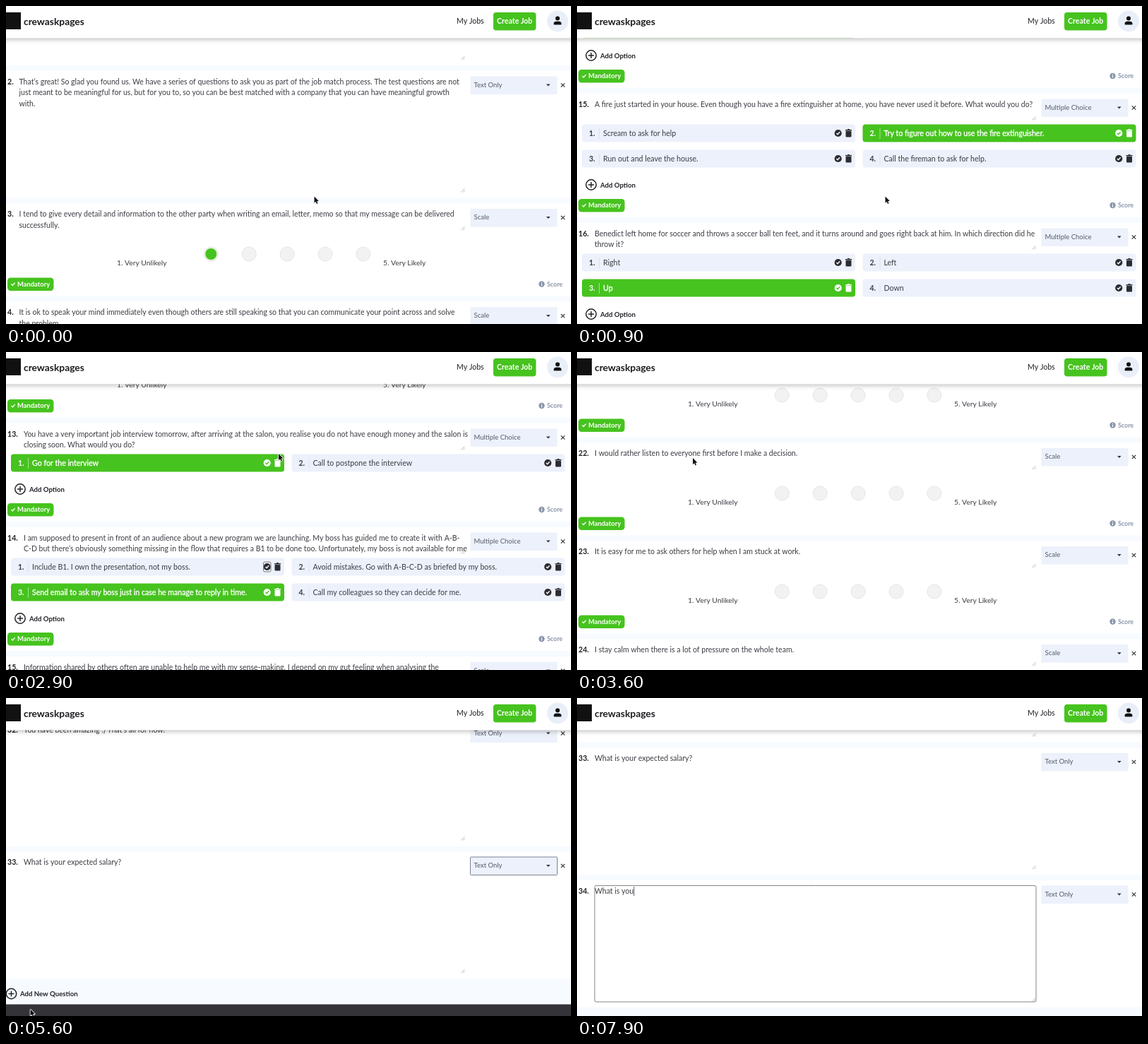
Recreate the animation shown at these times as an HTML page with a canvas. Size 800 by 450 pixels, loop 8 s.

```html
<!DOCTYPE html>
<html lang="en">
<head>
<meta charset="utf-8">
<title>Question editor</title>
<style>
html, body { margin: 0; width: 100%; height: 100%; overflow: hidden; background: #fff; }
canvas { display: block; }
</style>
</head>
<body>
<canvas id="stage" width="800" height="450"></canvas>
<script>
const c = document.getElementById('stage').getContext('2d');
const GREEN = '#46c31e', PALE = '#ecf1fb', INK = '#3c3c44', DARK = '#222228', SLATE = '#8a96ab';
const LOOP = 8000, STEP = 100;

// Drawing helpers
function text(s, x, y, size = 10.52, color = INK, weight = 400) {
  c.font = `${weight} ${size}px Lato, sans-serif`;
  c.fillStyle = color;
  c.fillText(s, x, y + size * 0.35);
}
function box(x, y, w, h, r, fill, stroke, line = 1) {
  c.beginPath();
  c.roundRect(x, y, w, h, r);
  if (fill) { c.fillStyle = fill; c.fill(); }
  if (stroke) { c.strokeStyle = stroke; c.lineWidth = line; c.stroke(); }
}
function disc(x, y, r, fill, stroke, line = 1) {
  c.beginPath();
  c.arc(x, y, r, 0, 7);
  if (fill) { c.fillStyle = fill; c.fill(); }
  if (stroke) { c.strokeStyle = stroke; c.lineWidth = line; c.stroke(); }
}
function path(points, color, line) {
  c.beginPath();
  points.forEach(([x, y]) => c.lineTo(x, y));
  if (line) { c.strokeStyle = color; c.lineWidth = line; c.stroke(); }
  else { c.fillStyle = color; c.fill(); }
}
function tick(x, y, color, s = 1) {
  path([[x - 2.5 * s, y], [x - 0.7 * s, y + 1.9 * s], [x + 2.7 * s, y - 1.9 * s]], color, 1.4);
}
function plus(x, y, label, labelX) {
  disc(x, y, 7.2, null, DARK, 1.5);
  path([[x - 4, y], [x + 4, y]], DARK, 1.5);
  path([[x, y - 4], [x, y + 4]], DARK, 1.5);
  text(label, labelX, y + 0.5, 9.6, DARK, 700);
}
function grip(x, y) {
  path([[x - 2.5, y + 2.5], [x + 2.5, y - 2.5]], '#aaa', 0.8);
  path([[x + 0.3, y + 2.5], [x + 2.5, y + 0.3]], '#aaa', 0.8);
}

// Questions
const scale = (q, pick = 0) => ({ kind: 'Scale', q, pick });
const choice = (q, options, pick) => ({ kind: 'Multiple Choice', q, options, pick });
const only = q => ({ kind: 'Text Only', q });
const open = q => ({ kind: 'Text Question', q });

const traits = [
  'I prefer to plan my work well before I start doing it.',
  'I feel comfortable sharing my ideas with people I have just met.',
  'When plans change at the last minute, I can adjust to them easily.',
  'I like to finish one task completely before I move on to the next.',
  'I would rather listen to everyone first before I make a decision.',
  'It is easy for me to ask others for help when I am stuck at work.',
  'I stay calm when there is a lot of pressure on the whole team.'
];
const filler = (n, pick) => Array.from({ length: n }, (_, i) => scale(traits[i % 7], pick));

const fire = choice('A fire just started in your house. Even though you have a fire extinguisher at home, you have never used it before. What would you do?',
  ['Scream to ask for help', 'Try to figure out how to use the fire extinguisher.', 'Run out and leave the house.', 'Call the fireman to ask for help.'], 2);
const ball = choice('Benedict left home for soccer and throws a soccer ball ten feet, and it turns around and goes right back at him. In which direction did he|throw it?',
  ['Right', 'Left', 'Up', 'Down'], 3);
const salary = open('');
const added = only('');
const SALARY = 'What is your expected salary?', NEXT = 'What is your';

const start = [
  only('Hi there! Thank you for your interest in joining us.'),
  only('That’s great! So glad you found us. We have a series of questions to ask you as part of the job match process. The test questions are not|just meant to be meaningful for us, but for you to, so you can be best matched with a company that you can have meaningful growth|with.'),
  scale('I tend to give every detail and information to the other party when writing an email, letter, memo so that my message can be delivered|successfully.', 1),
  scale('It is ok to speak your mind immediately even though others are still speaking so that you can communicate your point across and solve|the problem.', 1),
  ...filler(8, 1),
  choice('You have a very important job interview tomorrow, after arriving at the salon, you realise you do not have enough money and the salon is|closing soon. What would you do?',
    ['Go for the interview', 'Call to postpone the interview'], 1),
  choice('I am supposed to present in front of an audience about a new program we are launching. My boss has guided me to create it with A-B-|C-D but there’s obviously something missing in the flow that requires a B1 to be done too. Unfortunately, my boss is not available for me',
    ['Include B1. I own the presentation, not my boss.', 'Avoid mistakes. Go with A-B-C-D as briefed by my boss.', 'Send email to ask my boss just in case he manage to reply in time.', 'Call my colleagues so they can decide for me.'], 3),
  fire, ball,
  scale('Information shared by others often are unable to help me with my sense-making. I depend on my gut feeling when analysing the|situation.', 1),
  scale('Some people in a group will inevitably be less capable than others, and it leads to unfair balance of workload.'),
  scale('I enjoy working alone.'),
  ...filler(11, 0),
  open('What do you enjoy the most about your work?'),
  open('Why would you like to join our company?'),
  open('How long is your notice period?'),
  only('You have been amazing :) That’s all for now!'),
  salary
];

const height = k => k.kind === 'Scale' ? 139 : k.kind === 'Text Only' ? 187.5
  : k.kind === 'Text Question' ? 174 : 111 + 36 * Math.ceil(k.options.length / 2);

// Scroll keys: time, question number, its place on the stage
const scrolls = [[0, 2, 107], [900, 14, -44], [1800, 14, -44], [2300, 14, 263], [3000, 14, 263],
  [4200, 31, 189], [4500, 32, 58], [5200, 32, 58], [5300, 32, 45], [5800, 33, 232.5], [6300, 33, 85.5]];
// Pointer keys: time, x, y
const moves = [[0, 436.5, 269.5], [900, 436.5, 269.5], [1300, 789, 142], [1800, 789, 142], [2300, 370, 301],
  [2500, 370, 301], [2900, 386, 144], [3000, 386, 144], [3500, 164, 150], [4200, 164, 150],
  [4500, 150, 242], [5000, 150, 242], [5300, 700, 238], [5600, 34.5, 440.5], [5800, 7, 417],
  [6400, 7, 417], [7000, 150, 300]];

function track(keys, t, value) {
  const i = keys.findLastIndex(k => k[0] <= t);
  const a = keys[i], b = keys[i + 1] || a;
  const p = b === a ? 0 : (t - a[0]) / (b[0] - a[0]);
  const e = p * p * (3 - 2 * p);
  return value(a) * (1 - e) + value(b) * e;
}

function badge(y, required) {
  box(2, y - 9, required ? 65.5 : 67.5, 18.5, 4.5, required ? GREEN : '#d0f2c6');
  if (required) tick(10, y, '#fff');
  text(required ? 'Mandatory' : 'Not Required', required ? 16 : 7, y, 9.4, '#fff', 700);
  disc(758.5, y, 4.2, SLATE);
  path([[758.5, y - 0.7], [758.5, y + 2.5]], '#fff', 1.2);
  path([[758.5, y - 2.6], [758.5, y - 1.5]], '#fff', 1.2);
  text('Score', 766, y, 8.9, SLATE, 700);
}

function option(label, i, y, on, focused) {
  const x = i % 2 ? 397.5 : 0, ink = on ? '#fff' : INK, icon = on ? '#fff' : '#2c2c33';
  box(x + 7, y - 12.5, 387, 25, 4, on ? GREEN : PALE);
  text(`${i + 1}.`, x + 17, y, 10.5, ink, 700);
  path([[x + 31.5, y - 7], [x + 31.5, y + 8]], on ? '#a5e48f' : '#dce3ef', 1);
  text(label, x + 37, y, 10.6, ink);
  if (on) {
    c.strokeStyle = '#fff';
    c.lineWidth = 0.35;
    c.strokeText(label, x + 37, y + 10.6 * 0.35);
  }
  disc(x + 369.7, y, 5.1, icon);
  tick(x + 369.7, y, on ? GREEN : '#fff', 0.9);
  if (focused) box(x + 364.5, y - 7, 10.5, 14, 2, null, '#777');
  box(x + 380.5, y - 3, 8, 8.5, 1, icon);
  box(x + 380, y - 5, 9, 1.5, 0, icon);
  box(x + 383, y - 6, 3, 1.5, 0, icon);
}

function question(k, n, y, t) {
  const h = height(k), tall = k.kind === 'Text Only';
  box(0, y - 15, 800, h - 8, 0, '#fff');
  text(`${n}.`, 2, y, 10.6, DARK, 700);
  const x = n > 9 ? 25 : 18.5;
  k.q.split('|').forEach((s, i) => text(s, x, y + 15.5 * i));

  const typing = k === salary ? t >= 4500 && t < 5200 : k === added && t >= 7100;
  if (typing) {
    box(25, y - 7.5, 625, tall ? 164.5 : 30, 2, null, '#858585');
    const end = 25.5 + c.measureText(k.q).width;
    path([[end, y - 6], [end, y + 7]], '#333', 0.8);
  }
  grip(647, y + (tall ? 154 : 20));

  const picked = k === salary && t >= 5300 && t < 5800;
  box(657.5, y - 7.5, 123, 25.5, 1, PALE, picked ? '#7c8290' : null);
  text(k.kind, 662.5, y + 4.5, 9.5, '#555b66');
  path([[765, y + 3.5], [770.6, y + 3.5], [767.8, y + 6.5]], '#333');
  if (n === 15 && t >= 1400 && t < 2300) box(781, y - 7.5, 16, 25.5, 2, '#fff', '#777');
  path([[785.8, y + 2.3], [791.2, y + 7.7]], '#333', 1.2);
  path([[785.8, y + 7.7], [791.2, y + 2.3]], '#333', 1.2);

  if (k.kind === 'Scale') {
    for (let i = 0; i < 5; i++) {
      const cx = 290.3 + 53.9 * i, on = i + 1 === k.pick;
      disc(cx, y + 56.5, 10, on ? '#e6f4e1' : '#f2f2f2', '#e6e6e6');
      if (on) disc(cx, y + 56.5, 8, GREEN);
    }
    text('1. Very Unlikely', 157, y + 69, 10.3);
    text('5. Very Likely', 534, y + 69, 10.3);
    badge(y + 99, true);
  } else if (k.options) {
    k.options.forEach((s, i) => option(s, i, y + 41 + 36 * (i >> 1), i + 1 === k.pick,
      n === 14 && i === 0 && t >= 2400));
    plus(20, y + h - 69, 'Add Option', 33);
    badge(y + h - 40, true);
  } else if (!tall) {
    box(2.5, y + 31.5, 794, 81, 5, '#fff', '#e4e7ed');
    text('Candidate answer goes here', 10, y + 47, 10.6, '#959daa');
    grip(793, y + 109);
    badge(y + 134, false);
  }
}

function header() {
  c.save();
  c.shadowColor = 'rgba(0,0,0,.28)';
  c.shadowBlur = 7;
  c.shadowOffsetY = 1;
  box(-20, -20, 840, 65.5, 0, '#fff');
  c.restore();
  box(0, 9, 21, 24, 0, '#111');
  text('crewaskpages', 25, 22, 13.8, '#1c1c20', 700);
  text('My Jobs', 638, 21.5, 10.6, DARK);
  box(690, 9, 60.5, 25.5, 4, GREEN);
  text('Create Job', 695, 21.5, 10.6, '#fff', 700);
  disc(781, 21.5, 15, '#e9eff9');
  disc(781, 17.5, 3, '#111');
  box(775.5, 21.8, 11, 4.7, [4, 4, 1, 1], '#111');
}

function pointer(x, y, hand) {
  c.save();
  c.translate(x, y);
  c.lineJoin = 'round';
  if (hand) {
    box(-1, 4, 8, 7, 2.5, '#fff', '#222');
    box(-1, 0, 2.6, 7, 1.3, '#fff', '#222');
    box(-0.4, 4.6, 6.8, 4, 1, '#fff');
  } else {
    const arrow = [[0, 0], [0, 9.2], [2.1, 7.3], [3.5, 10.4], [5, 9.7], [3.7, 6.8], [6.4, 6.6], [0, 0]];
    path(arrow, '#fff', 1.6);
    path(arrow, '#111');
  }
  c.restore();
}

function draw(t) {
  const typed = (s, from, to) => s.slice(0, Math.max(0, Math.round((t - from) / (to - from) * s.length)));
  salary.q = typed(SALARY, 4500, 5100);
  salary.kind = t < 5300 ? 'Text Question' : 'Text Only';
  added.q = typed(NEXT, 7200, 7950).slice(0, 11);
  const list = start.filter(k => !(k === fire && t >= 1400 || k === ball && t >= 1600));
  if (t >= 5800) list.push(added);

  let end = 0;
  const tops = list.map(k => (end += height(k)) - height(k));
  const scroll = track(scrolls, t, k => tops[k[1] - 1] - k[2]);

  box(0, 0, 800, 450, 0, '#f7fbff');
  list.forEach((k, i) => {
    const y = tops[i] - scroll;
    if (y > -190 && y < 470) question(k, i + 1, y, t);
  });
  plus(7.5, end - scroll - 1.5, 'Add New Question', 20);
  box(0, end - scroll + 13.5, 800, 60, 0, '#343338');
  header();
  if (t < 7200) {
    const at = i => track(moves, t, k => k[i]);
    pointer(at(1), at(2), t >= 1300 && t <= 1800);
  }
}

function frame(now) {
  draw(Math.floor(now % LOOP / STEP) * STEP);
  requestAnimationFrame(frame);
}
requestAnimationFrame(frame);
</script>
</body>
</html>
```
